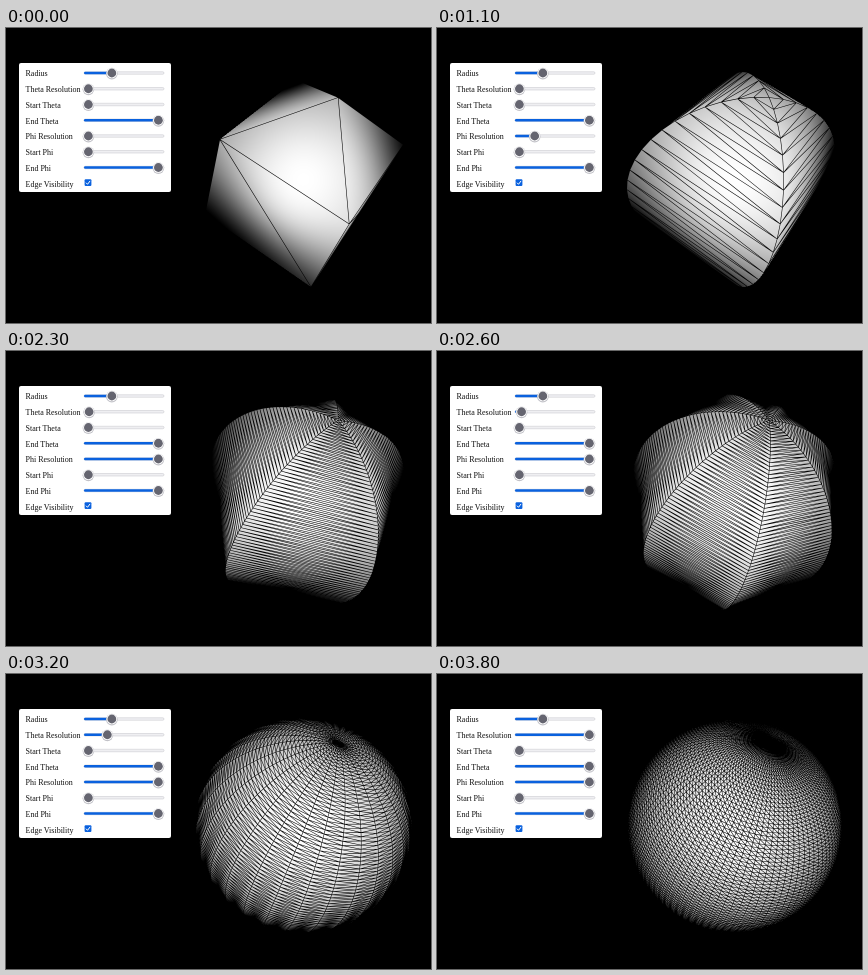
An HTML page with a canvas for the animation above (4.1 s loop, 425 by 295 pixels).

```html
<!DOCTYPE html>
<html lang="en">
<head>
<meta charset="utf-8">
<title>Sphere source</title>
<style>
  html, body { margin: 0; width: 100%; height: 100%; overflow: hidden; background: #000; }
  canvas, svg { position: absolute; left: 0; top: 0; width: 425px; height: 295px; }
  text { font: 8px "Liberation Serif", "Times New Roman", serif; fill: #111; }
</style>
</head>
<body>
<canvas id="view" width="850" height="590"></canvas>
<svg id="panel" viewBox="0 0 425 295">
  <rect x="13" y="35" width="152" height="129" rx="2" fill="#fff"/>
</svg>
<script>
const SCALE = 2, WIDTH = 850, HEIGHT = 590;
const FIRST_MS = 500, STEP_MS = 300, LOOP_MS = 4100;

// [theta resolution, phi resolution] for each step
const STEPS = [[4, 4], [4, 7], [4, 14], [4, 25], [4, 48], [4, 71], [4, 95],
               [5, 100], [7, 100], [15, 100], [30, 100], [62, 100], [100, 100]];

// Sphere axes in view space: x right, y up, z towards the viewer
const AXIS_X = [0.9307, 0.0048, -0.3661];
const AXIS_Y = [-0.2404, 0.7621, -0.6012];
const AXIS_Z = [0.276, 0.648, 0.71];
const CENTER = [297.3, 151.4], DISTANCE = 4.2, FOCAL = 441;

const ctx = document.getElementById('view').getContext('2d');

function vertex(theta, phi) {
  const u = Math.sin(phi) * Math.cos(theta);
  const v = Math.sin(phi) * Math.sin(theta);
  const w = Math.cos(phi);
  const [x, y, z] = [0, 1, 2].map(k => u * AXIS_X[k] + v * AXIS_Y[k] + w * AXIS_Z[k]);
  const depth = DISTANCE - z;
  return {
    x: SCALE * (CENTER[0] + FOCAL * x / depth),
    y: SCALE * (CENTER[1] - FOCAL * y / depth),
    normal: [x / depth, y / depth, z / depth]
  };
}

const cross = (a, b, x, y) => (b.x - a.x) * (y - a.y) - (b.y - a.y) * (x - a.x);
const isFront = (a, b, c) => cross(a, b, c.x, c.y) < -1e-6;

// Headlight shading with interpolated normals
function shadeTriangle(data, a, b, c) {
  const area = cross(a, b, c.x, c.y);
  const left = Math.floor(Math.min(a.x, b.x, c.x)), right = Math.ceil(Math.max(a.x, b.x, c.x));
  const top = Math.floor(Math.min(a.y, b.y, c.y)), bottom = Math.ceil(Math.max(a.y, b.y, c.y));
  const p = a.normal, q = b.normal, r = c.normal;
  for (let y = top; y <= bottom; y++) {
    for (let x = left; x <= right; x++) {
      const wa = cross(b, c, x + 0.5, y + 0.5) / area;
      const wb = cross(c, a, x + 0.5, y + 0.5) / area;
      const wc = 1 - wa - wb;
      if (wa < -1e-6 || wb < -1e-6 || wc < -1e-6) continue;
      const nx = wa * p[0] + wb * q[0] + wc * r[0];
      const ny = wa * p[1] + wb * q[1] + wc * r[1];
      const nz = wa * p[2] + wb * q[2] + wc * r[2];
      const light = 255 * Math.max(0, nz / Math.sqrt(nx * nx + ny * ny + nz * nz));
      const at = 4 * (y * WIDTH + x);
      data[at] = data[at + 1] = data[at + 2] = light;
    }
  }
}

function drawSphere(thetaCount, phiCount) {
  const image = ctx.createImageData(WIDTH, HEIGHT);
  for (let k = 3; k < image.data.length; k += 4) image.data[k] = 255;
  const columns = Array.from({ length: thetaCount }, (_, i) =>
    Array.from({ length: phiCount }, (_, j) =>
      vertex(2 * Math.PI * i / thetaCount, Math.PI * j / (phiCount - 1))));

  const edges = new Path2D();
  const addEdge = (a, b) => { edges.moveTo(a.x, a.y); edges.lineTo(b.x, b.y); };
  columns.forEach((column, i) => {
    const next = columns[(i + 1) % thetaCount];
    for (let j = 0; j < phiCount - 1; j++) {
      const a = column[j], b = column[j + 1], c = next[j + 1], d = next[j];
      if (isFront(a, b, c)) {
        shadeTriangle(image.data, a, b, c);
        addEdge(a, b);
        addEdge(a, c);
      }
      if (isFront(a, c, d)) {
        shadeTriangle(image.data, a, c, d);
        addEdge(a, d);
      }
    }
  });
  ctx.putImageData(image, 0, 0);
  ctx.lineWidth = 0.56 * SCALE;
  ctx.strokeStyle = '#000';
  ctx.stroke(edges);
}

const panel = document.getElementById('panel');
function add(tag, attributes, content = '') {
  const node = document.createElementNS(panel.namespaceURI, tag);
  for (const key in attributes) node.setAttribute(key, attributes[key]);
  node.textContent = content;
  return panel.appendChild(node);
}

const rowY = row => 45 + 15.75 * row;
const label = (row, content) => add('text', { x: 19.5, y: rowY(row) + 3.4 }, content);

function addSlider(row, name, fraction) {
  const y = rowY(row);
  label(row, name);
  add('rect', { x: 78, y: y - 1.25, width: 80, height: 2.5, rx: 1.25,
                fill: '#efeff2', stroke: '#c2c2c8', 'stroke-width': 0.5 });
  const fill = add('rect', { x: 78, y: y - 1.3, height: 2.6, rx: 1.3, fill: '#0a61de' });
  const thumb = ['#c2c2c8', '#fff', '#656570'].map((color, k) =>
    add('circle', { cy: y + (k ? 0 : 0.6), r: [5.8, 5.2, 4.4][k], fill: color }));
  const set = value => {
    const x = 82.4 + 70 * value;
    fill.setAttribute('width', x - 78);
    thumb.forEach(circle => circle.setAttribute('cx', x));
  };
  set(fraction);
  return set;
}

const sliders = [['Radius', 0.335], ['Theta Resolution', 0], ['Start Theta', 0], ['End Theta', 1],
                 ['Phi Resolution', 0], ['Start Phi', 0], ['End Phi', 1]]
  .map(([name, fraction], row) => addSlider(row, name, fraction));
label(7, 'Edge Visibility');
add('rect', { x: 78.6, y: 151.2, width: 6.8, height: 6.8, rx: 1, fill: '#0a61de' });
add('path', { d: 'M80 154.7l1.5 1.6 2.6-3.4', fill: 'none', stroke: '#fff', 'stroke-width': 1 });

const fractionOf = count => (count - 4) / 96;
let shown = -1;
function tick() {
  const time = performance.now() % LOOP_MS;
  const step = time < FIRST_MS ? 0 : 1 + Math.floor((time - FIRST_MS) / STEP_MS);
  if (step !== shown) {
    shown = step;
    const [theta, phi] = STEPS[step];
    sliders[1](fractionOf(theta));
    sliders[4](fractionOf(phi));
    drawSphere(theta, phi);
  }
  requestAnimationFrame(tick);
}
tick();
</script>
</body>
</html>
```
